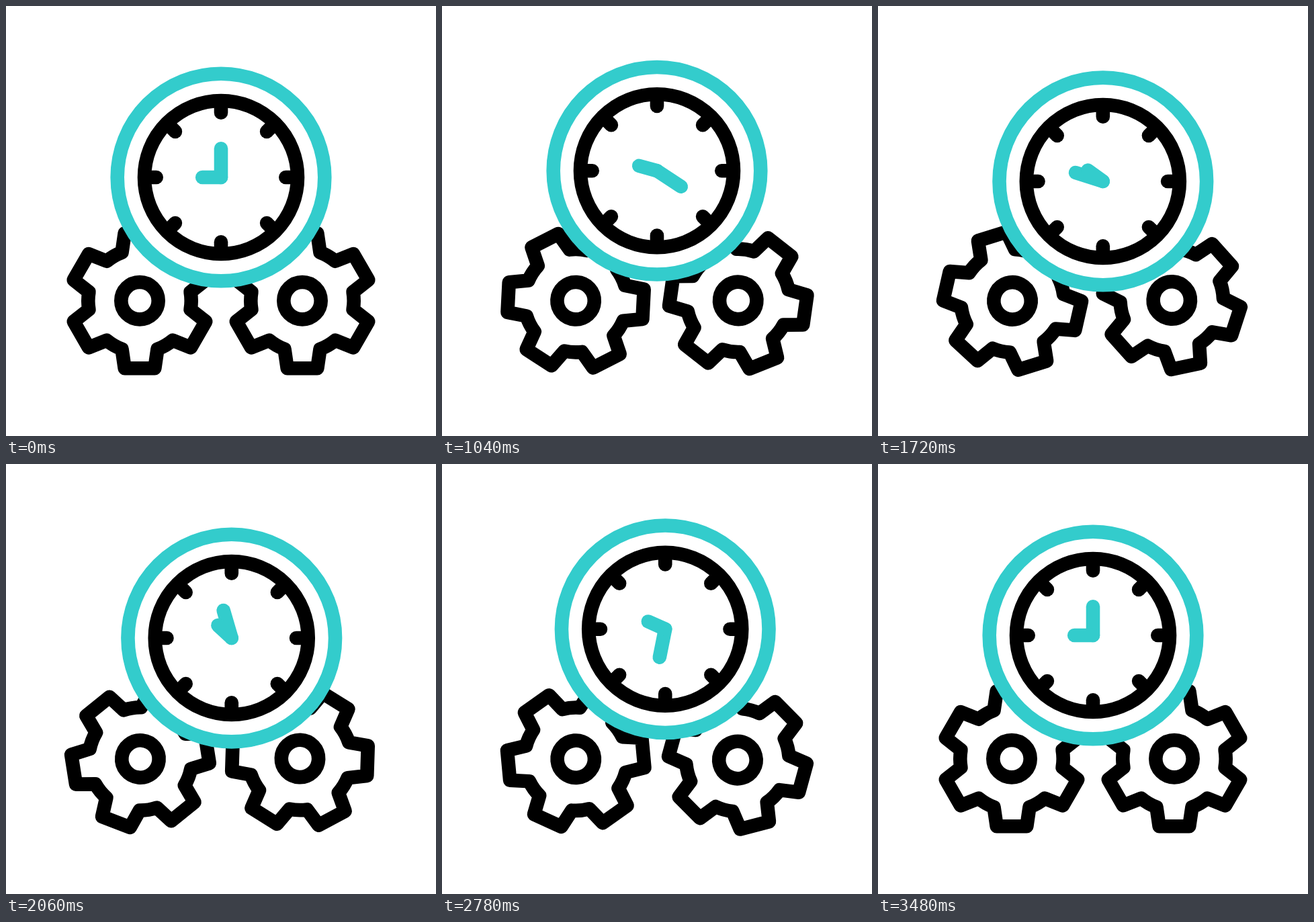
These frames come from a looping animation (640x640 px, 3.6 s). An HTML page with a canvas:

```html
<!DOCTYPE html>
<html>
<head>
<meta charset="utf-8">
<style>
html, body { margin: 0; width: 100%; height: 100%; overflow: hidden; background: #fff; }
canvas { display: block; width: 640px; height: 640px; }
</style>
</head>
<body>
<canvas id="stage" width="640" height="640"></canvas>
<script>
const canvas = document.getElementById('stage');
const ctx = canvas.getContext('2d');
const dpr = window.devicePixelRatio || 1;
canvas.width = canvas.height = 640 * dpr;

const LOOP = 3600, STEP = 20, LINE = 20.6;
const TEAL = '#33cccc', BLACK = '#000';
const RAD = Math.PI / 180, TAU = Math.PI * 2;

const smooth = s => s * s * (3 - 2 * s);
const progress = (t, from, to) => Math.min(1, Math.max(0, (t - from) / (to - from)));

// Cubic bezier easing with flat ends: handles (x1, 0) and (x2, 1).
function ease(x, x1, x2) {
  let lo = 0, hi = 1;
  for (let i = 0; i < 24; i++) {
    const s = (lo + hi) / 2, r = 1 - s;
    if (3 * s * r * r * x1 + 3 * s * s * r * x2 + s * s * s < x) lo = s;
    else hi = s;
  }
  return smooth((lo + hi) / 2);
}

// Rises to 1 and swings back to 0.
function swing(t, start, top, back, end, x2) {
  return t < Math.max(top, back) - 10
    ? smooth(progress(t, start, top))
    : 1 - ease(progress(t, back, end), 0.288, x2);
}

const KEY_TIMES = [200, 880, 1880, 2559, 3440];

// Drift through three offsets, starting and ending at rest.
function drift(t, points) {
  const stops = [[0, 0], ...points, [0, 0]];
  let i = 0;
  while (i < 3 && t > KEY_TIMES[i + 1]) i++;
  const k = smooth(progress(t, KEY_TIMES[i], KEY_TIMES[i + 1]));
  return stops[i].map((v, axis) => v + (stops[i + 1][axis] - v) * k);
}

function ring(radius, color, fill) {
  ctx.beginPath();
  ctx.arc(0, 0, radius, 0, TAU);
  if (fill) {
    ctx.fillStyle = fill;
    ctx.fill();
  }
  ctx.strokeStyle = color;
  ctx.stroke();
}

function spoke(degrees, from, to) {
  const x = Math.sin(degrees * RAD), y = -Math.cos(degrees * RAD);
  ctx.beginPath();
  ctx.moveTo(x * from, y * from);
  ctx.lineTo(x * to, y * to);
  ctx.stroke();
}

function gear(x, y, degrees) {
  const tipR = Math.hypot(22.3, 100.6), tipA = Math.atan2(22.3, 100.6);
  const rootR = 76.7, rootA = 20.2 * RAD;
  ctx.save();
  ctx.translate(x, y);
  ctx.rotate(degrees * RAD);
  ctx.beginPath();
  for (let i = 0; i < 6; i++) {
    const a = (30 + i * 60) * RAD;
    for (const side of [-1, 1]) {
      const p = a + side * tipA;
      if (side < 0) ctx.lineTo(rootR * Math.cos(a - rootA), rootR * Math.sin(a - rootA));
      ctx.lineTo(tipR * Math.cos(p), tipR * Math.sin(p));
    }
    ctx.arc(0, 0, rootR, a + rootA, a + TAU / 6 - rootA);
  }
  ctx.closePath();
  ctx.strokeStyle = BLACK;
  ctx.stroke();
  ring(27.7, BLACK);
  ctx.restore();
}

function clock(x, y, turn) {
  ctx.save();
  ctx.translate(x, y);
  ring(154.3, TEAL, '#fff');
  ring(114, BLACK);
  for (let i = 0; i < 8; i++) spoke(i * 45, 96.3, 112);
  ctx.strokeStyle = TEAL;
  spoke(turn * 360, 0, 42.8);
  spoke(270 + turn * 45, 0, 27.8);
  ctx.restore();
}

function draw(t) {
  ctx.setTransform(dpr, 0, 0, dpr, 0, 0);
  ctx.fillStyle = '#fff';
  ctx.fillRect(0, 0, 640, 640);
  ctx.lineWidth = LINE;
  ctx.lineCap = ctx.lineJoin = 'round';

  const [lx, ly] = drift(t, [[0, 0], [1.1, 0.2], [0.3, 0.6]]);
  const [rx, ry] = drift(t, [[0, -0.3], [-4, -0.8], [-1.3, 2.2]]);
  const [cx, cy] = drift(t, [[-1.2, -11], [16, 7.2], [14.5, -11]]);

  gear(199 + lx, 438.7 + ly, -219 * swing(t, 255, 2075, 2248, 3440, 0.465));
  gear(441 + rx, 438.7 + ry, 284 * swing(t, 200, 2325, 2300, 3490, 0.597));
  clock(320 + cx, 255 + cy, swing(t, 200, 2335, 2310, 3450, 0.53));
}

const began = performance.now();
function tick() {
  const t = (performance.now() - began) % LOOP;
  draw(Math.floor(t / STEP) * STEP);
  requestAnimationFrame(tick);
}
tick();
</script>
</body>
</html>
```
